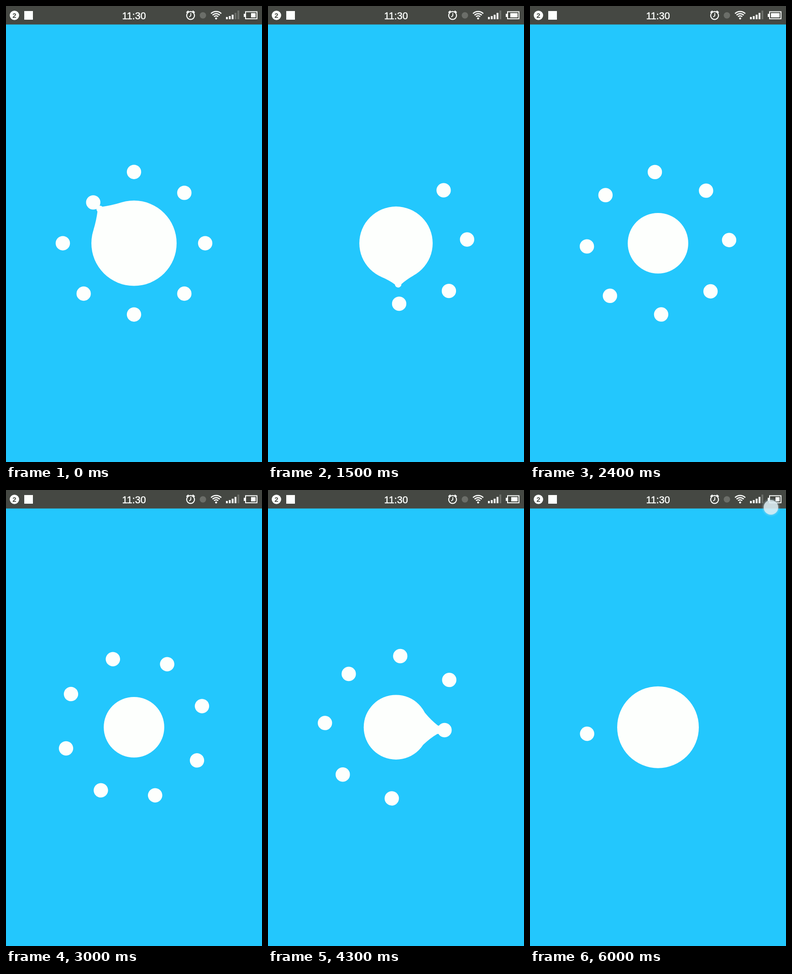
An HTML page with a canvas for the animation above (6.1 s loop, 561 px wide and 998 px high).

```html
<!DOCTYPE html>
<html lang="en">
<head>
<meta charset="utf-8">
<title>Sticky loader</title>
<style>
  html, body { margin: 0; width: 100%; height: 100%; overflow: hidden; background: #23c7fd; }
  canvas { display: block; width: 561px; height: 998px; }
</style>
</head>
<body>
<canvas id="stage" width="561" height="998"></canvas>
<script>
const ctx = document.getElementById('stage').getContext('2d');
const LOOP = 6100, STEP = 100, START = 680;
const CX = 280.5, CY = 519.2, ORBIT = 156, DOT = 15.7, COUNT = 8;
const R_MAX = 93.4, R_MIN = 66.3;
const SKY = '#23c7fd', BAR = '#454843', WHITE = '#fdfffd', DIM = '#6b6e69';

// [ms, value]: dots released so far, and ring rotation in degrees
const RELEASED = [[680, 0], [1500, 3.85], [2370, 8], [4030, 8], [5670, 0], [5760, 0], [6100, 1.65]];
const ROTATION = [[680, 0], [1500, 42], [5670, 252.6], [5760, 252.6], [6100, 269.8]];

function sample(keys, t) {
  for (let i = 1; i < keys.length; i++) {
    const [t0, a] = keys[i - 1], [t1, b] = keys[i];
    if (t <= t1) return a + (b - a) * (t - t0) / (t1 - t0);
  }
  return keys[keys.length - 1][1];
}

function disc(x, y, r, color = WHITE) {
  ctx.fillStyle = color;
  ctx.beginPath();
  ctx.arc(x, y, r, 0, Math.PI * 2);
  ctx.fill();
}

function box(x, y, w, h, color = WHITE) {
  ctx.fillStyle = color;
  ctx.fillRect(x, y, w, h);
}

function line(points, width, color = WHITE) {
  ctx.strokeStyle = color;
  ctx.lineWidth = width;
  ctx.beginPath();
  points.forEach(([x, y]) => ctx.lineTo(x, y));
  ctx.stroke();
}

function arc(x, y, r, from, to, width) {
  ctx.strokeStyle = WHITE;
  ctx.lineWidth = width;
  ctx.beginPath();
  ctx.arc(x, y, r, from, to);
  ctx.stroke();
}

// Sticky bulge along the +x axis; it follows the dot, then springs back
function bulge(r, dist, p) {
  const rest = 1 - p;
  const tip = Math.min(dist, r + 64 * rest);
  const w = 5 + 14 * rest;
  if (tip + w <= r) return;
  const spread = 0.38 + 0.45 * rest;
  const bx = r * Math.cos(spread), by = r * Math.sin(spread);
  const mx = (bx + tip) / 2, my = (by + w) / 2 - 3;
  ctx.fillStyle = WHITE;
  ctx.beginPath();
  ctx.moveTo(0, 0);
  ctx.lineTo(bx, by);
  ctx.quadraticCurveTo(mx, my, tip, w);
  ctx.lineTo(tip, -w);
  ctx.quadraticCurveTo(mx, -my, bx, -by);
  ctx.fill();
  disc(tip, 0, w);
}

function loader(t) {
  const waiting = t < START;
  const released = waiting ? 7.81 : sample(RELEASED, t);
  const turn = waiting ? 0 : sample(ROTATION, t);
  const r = waiting ? R_MAX : R_MAX - (R_MAX - R_MIN) * released / COUNT;
  disc(CX, CY, r);
  for (let i = 0; i < COUNT; i++) {
    const p = Math.min(1, released - i);
    if (p <= 0) break;
    ctx.save();
    ctx.translate(CX, CY);
    ctx.rotate((turn - 90 + i * 360 / COUNT) * Math.PI / 180);
    if (p < 1 && ORBIT * p + DOT > r) bulge(r, ORBIT * p, p);
    disc(ORBIT * p, 0, DOT);
    ctx.restore();
  }
}

function alarm() {
  arc(404.5, 20.8, 8.6, 0, Math.PI * 2, 2.2);
  line([[405, 15.5], [405, 21.3], [401.5, 24]], 1.8);
  line([[395.5, 14.5], [400, 10.8]], 2.4);
  line([[413.5, 14.5], [409, 10.8]], 2.4);
}

function wifi() {
  const mid = -Math.PI / 2;
  disc(460.5, 27.3, 2.2);
  [6.5, 11.2, 16].forEach(r => arc(460.5, 28, r, mid - 0.78, mid + 0.78, 2.5));
}

function signal(level) {
  [5, 7, 10, 14, 19].forEach((h, i) =>
    box(482 + i * 6.3, 29 - h, 4, h, i < level ? WHITE : DIM));
}

function battery(t) {
  const left = Math.round(538 - 3.6 * ((t + 400) % 3200) / 1000);
  ctx.strokeStyle = WHITE;
  ctx.lineWidth = 2;
  ctx.strokeRect(525, 12.5, 25, 15.5);
  box(521, 17, 3, 7);
  box(left, 15.5, 547 - left, 9.5);
}

function statusBar(t) {
  box(0, 0, 561, 40.5, BAR);
  disc(18.5, 20.5, 10.3);
  ctx.textAlign = 'center';
  ctx.fillStyle = BAR;
  ctx.font = 'bold 15px "Liberation Sans", sans-serif';
  ctx.fillText('2', 18.5, 26);
  box(40, 11, 19, 19);
  ctx.font = '21.5px "Liberation Sans", sans-serif';
  ctx.fillStyle = ctx.strokeStyle = WHITE;
  ctx.lineWidth = 0.5;
  ctx.fillText('11:30', 280.5, 28.5);
  ctx.strokeText('11:30', 280.5, 28.5);
  alarm();
  disc(431.5, 20.5, 7, DIM);
  wifi();
  signal(t < 700 ? 3 : 4);
  battery(t);
}

function touch() {
  const glow = ctx.createRadialGradient(528, 38, 13, 528, 38, 21);
  glow.addColorStop(0, 'rgba(190,225,235,.5)');
  glow.addColorStop(1, 'rgba(190,225,235,0)');
  disc(528, 38, 21, glow);
  disc(528, 38, 16, 'rgba(225,240,245,.78)');
}

function draw(now) {
  const t = Math.floor((now % LOOP) / STEP) * STEP;
  box(0, 0, 561, 998, SKY);
  loader(t);
  statusBar(t);
  if (t >= 6000) touch();
}

const origin = performance.now();
function tick() {
  draw(performance.now() - origin);
  requestAnimationFrame(tick);
}
tick();
</script>
</body>
</html>
```
